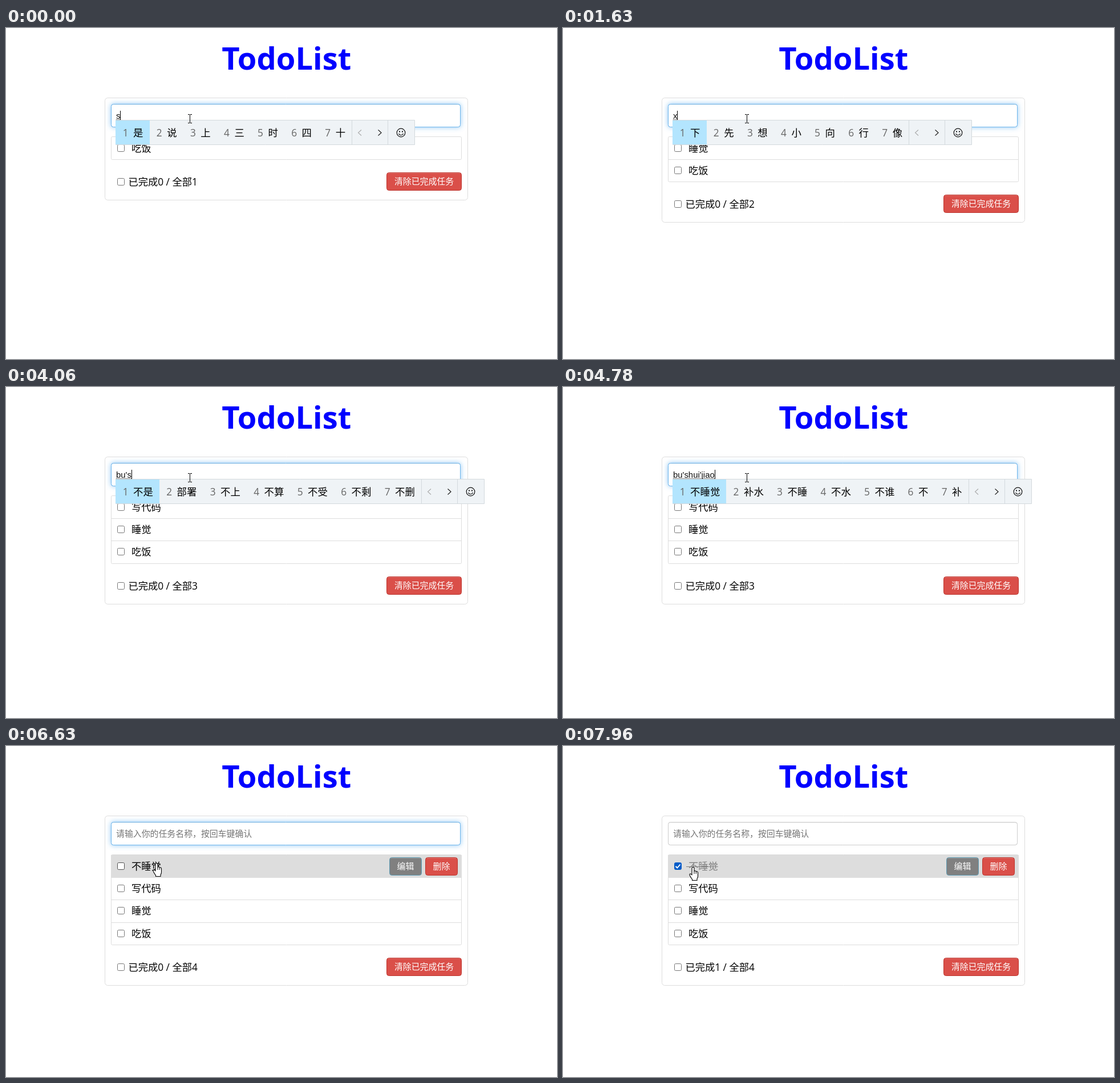
An HTML page with a canvas that plays this animation: 966x580 px, repeating every 8 s.

```html
<!DOCTYPE html>
<html lang="zh-CN">
<head>
<meta charset="utf-8">
<title>TodoList</title>
<style>
  html, body { margin: 0; width: 100%; height: 100%; overflow: hidden; background: #fff; }
  canvas { display: block; width: 966px; height: 580px; }
</style>
</head>
<body>
<canvas id="stage"></canvas>
<script>
const LOOP = 8000;
const LIST_TOP = 190.6, ROW = 39.4;
const CJK = '"Noto Sans CJK SC", "Noto Sans SC", "Noto Sans CJK", sans-serif';
const UI = '"Open Sans", ' + CJK;
const FIELD = '"Liberation Sans", ' + CJK;
const RED = ['#da4f49', '#bd362f'];
const GRAY = ['#808080', '#5f9db5'];

const canvas = document.getElementById('stage');
const ctx = canvas.getContext('2d');
const dpr = window.devicePixelRatio || 1;
canvas.width = 966 * dpr;
canvas.height = 580 * dpr;

// [time, field text, candidates]; candidates present means composing
const typing = [
  [0, "s", '是 说 上 三 时 四 十'],
  [120, "sh", '是 上 说 时 事 生 手'],
  [220, "shu", '书 数 树 属 输 熟 术'],
  [310, "shui", '水 睡 谁 税 说 帅 率'],
  [400, "shui'j", '睡觉 水晶 水饺 水机 水景 税局 税金'],
  [500, "shui'ji", '水机 水剂 水几 水迹 税基 水系 水鸡'],
  [590, "shui'jia", '水价 谁家 睡家 水加 睡佳 税价 水甲'],
  [770, "shui'jiao", '水价 谁家 睡家 水加 睡佳 税价 水甲'],
  [860, "shui'jiao", '睡觉 水饺 睡觉了 睡觉吧 睡觉去 水浇 水角'],
  [950, "睡觉"],
  [1200, ""],
  [1520, "x", ''],
  [1630, "x", '下 先 想 小 向 行 像'],
  [1730, "xi", '系 西 喜 洗 细 息 吸'],
  [1800, "xie", '系 西 喜 洗 细 息 吸'],
  [1860, "xie", '写 些 谢 鞋 斜 协 血'],
  [2030, "xie'd", '写的 写到 写得 写道 写点 写对 些的'],
  [2090, "xie'da", '写的 写到 写得 写道 写点 写对 些的'],
  [2150, "xie'da", '写大 写答 写达 鞋大 斜打 写打 谢大'],
  [2210, "xie'dai", '写大 写答 写达 鞋大 斜打 写打 谢大'],
  [2270, "xie'dai", '携带 鞋带 写代 懈怠 写带 斜带 谢戴'],
  [2430, "xie'dai'm", '写代码 携带 鞋带 写代 懈怠 写 些'],
  [2490, "xie'dai'ma", '写代码 携带 鞋带 写代 懈怠 写 些'],
  [2740, "写代码"],
  [2890, ""],
  [3690, "b", '不 吧 把 被 百 本 别'],
  [3820, "bu", '不 部 步 布 补 捕 卜'],
  [4060, "bu's", '不是 部署 不上 不算 不受 不剩 不删'],
  [4190, "bu'sh", '不是 不上 不少 不舒服 不爽 不熟 不时'],
  [4250, "bu'shu", '部署 不熟 不输 不属 不舒服 不数 补书'],
  [4430, "bu'shui", '不睡 补水 不水 不谁 布水 补税 不税'],
  [4500, "bu'shui'j", '不睡觉 补水 不睡 不水 不谁 补税 不'],
  [4570, "bu'shui'ji", '不睡觉 补水 不睡 不水 不谁 补税 不'],
  [4640, "bu'shui'jia", '不睡觉 补水 不睡 不水 不谁 补税 不'],
  [4710, "bu'shui'jiao", '不睡觉 补水 不睡 不水 不谁 补税 不'],
  [4780, "bu'shui'jiao", '不睡觉 补水 不睡 不水 不谁 不 补'],
  [4960, "不睡觉"],
  [5330, ""]
];

// [time, x, y] of the pointer hot spot
const pointer = [
  [0, 323, 158], [6330, 311, 163], [6390, 298, 170], [6450, 286, 180],
  [6510, 276, 190], [6570, 268, 200], [6630, 264, 205], [7060, 264, 212],
  [7120, 264, 219], [7180, 264, 226], [7240, 264, 231], [7360, 258, 226],
  [7420, 246, 217], [7480, 231, 208], [7540, 221, 203], [7600, 218, 201],
  [7960, 228, 212]
];

const added = [[1200, '睡觉'], [2890, '写代码'], [5330, '不睡觉']];
const caretOff = [[3260, 3690], [5510, 6010], [6510, 7060], [7510, LOOP]];
const BLUR = 7660, CHECK = 7720;

const latest = (list, t) => list.findLast(item => item[0] <= t);
const rowTop = i => Math.round(LIST_TOP + ROW * i);

function text(str, x, y, size, color, family = UI, align = 'left', weight = 400) {
  ctx.font = `${weight} ${size}px ${family}`;
  ctx.fillStyle = color;
  ctx.textAlign = align;
  ctx.fillText(str, x, y);
  return ctx.measureText(str).width;
}

function rect(x, y, w, h, fill) {
  ctx.fillStyle = fill;
  ctx.fillRect(x, y, w, h);
}

function box(x, y, w, h, r, fill, stroke) {
  ctx.beginPath();
  ctx.roundRect(x + .5, y + .5, w - 1, h - 1, r);
  ctx.fillStyle = fill;
  ctx.fill();
  ctx.strokeStyle = stroke;
  ctx.lineWidth = 1;
  ctx.stroke();
}

function line(color, width, ...pts) {
  ctx.beginPath();
  for (let i = 0; i < pts.length; i += 2) ctx.lineTo(pts[i], pts[i + 1]);
  ctx.strokeStyle = color;
  ctx.lineWidth = width;
  ctx.stroke();
}

function button(label, x, y, w, [fill, edge]) {
  box(x, y, w, 32, 4, fill, edge);
  rect(x + 3, y + 1, w - 6, 1, 'rgba(255,255,255,.2)');
  text(label, x + w / 2, y + 21.3, 14.9, '#fff', UI, 'center', 500);
}

function checkbox(y, checked, hover) {
  if (!checked) return box(195, y, 13, 13, 2, '#fff', hover ? '#4f4f4f' : '#767676');
  box(195, y, 13, 13, 2, '#005cc8', '#005cc8');
  line('#fff', 1.9, 197.5, y + 6.8, 200.3, y + 9.5, 205.5, y + 3.5);
}

function field(t, str, composing) {
  const focus = t < BLUR;
  const edge = focus ? '#6db5ec' : '#ccc';
  ctx.save();
  if (focus) {
    ctx.shadowColor = 'rgba(82,168,236,.6)';
    ctx.shadowBlur = 8 * dpr;
  }
  box(184, 133, 613, 41, 4, '#fff', edge);
  ctx.restore();
  box(184, 133, 613, 41, 4, '#fff', edge);
  rect(187, 134, 607, 1, 'rgba(0,0,0,.06)');

  let w = 0;
  if (str) w = text(str, 193, 159, 14.9, '#111', FIELD);
  else text('请输入你的任务名称，按回车键确认', 193, 159, 14.9, '#757575', FIELD);
  if (composing) {
    for (let x = 193; x < 193 + w; x += 2) rect(x, 160, 1, 1, '#222');
  }
  if (focus && !caretOff.some(([a, b]) => t >= a && t < b)) {
    rect(Math.round(193 + w), 145, 1, 16, '#000');
  }
}

function row(i, label, hover, done) {
  const y = rowTop(i), mid = y + 20;
  if (hover) rect(184, y, 615, rowTop(i + 1) - y + 1, '#ddd');
  checkbox(mid - 7, done, hover);
  const w = text(label, 220, mid + 6.3, 17.3, done ? '#808080' : '#000');
  if (done) rect(216, mid, w + 4, 1, '#808080');
  if (hover) {
    button('编辑', 672, y + 4, 57, GRAY);
    button('删除', 735, y + 4, 57, RED);
  }
}

function candidates(words) {
  const widths = words.map(w => 41.7 + 17.4 * w.length);
  const end = Math.round(192.4 + widths.reduce((a, b) => a + b));
  box(192, 161, end + 111 - 192, 44, 0, '#eff3f6', '#d3d9dd');
  rect(192, 162, Math.round(widths[0] + .5), 42, '#b3e5fe');
  let x = 192.4;
  words.forEach((word, i) => {
    text(i + 1, x + 12.3, 189.5, 17.3, '#666');
    text(word, x + 30.7, 190, 17.4, '#000');
    x += widths[i];
  });
  rect(end, 162, 1, 42, '#d3d9dd');
  rect(end + 63, 162, 1, 42, '#d3d9dd');
  line('#aaa', 1.1, end + 17, 178.5, end + 11.5, 183.5, end + 17, 188.5);
  line('#222', 1.2, end + 46.5, 178.5, end + 52, 183.5, end + 46.5, 188.5);

  const cx = end + 86.5, cy = 183.5;
  ctx.strokeStyle = '#111';
  ctx.lineWidth = 1.2;
  ctx.beginPath();
  ctx.arc(cx, cy, 7.3, 0, 7);
  ctx.stroke();
  ctx.beginPath();
  ctx.arc(cx, cy, 4.2, .35, Math.PI - .35);
  ctx.stroke();
  rect(cx - 3.5, cy - 3, 2, 2, '#111');
  rect(cx + 1.5, cy - 3, 2, 2, '#111');
}

const ARROW = new Path2D('M0 0V16.5L3.8 13L6.4 19L9 17.9L6.4 12H11.6Z');
const HAND = new Path2D('M-2 2Q-2 .5 0 .5Q2 .5 2 2V7.5Q2.6 6.4 4 6.8Q5.3 7.1 5.3 8.5' +
  'Q6.3 7.4 7.4 8Q8.5 8.5 8.5 10V16Q8.5 18.5 7 20.5V23.5H-1.5V21.5' +
  'Q-4 18.5 -5.6 15Q-6.6 12.4 -5.2 12Q-3.6 11.7 -2 14Z');

function cursor(x, y, shape) {
  if (shape === 'beam') {
    rect(x - 1, y - 6, 1, 14, '#000');
    for (const dy of [-7, 8]) {
      rect(x - 4, y + dy, 3, 1, '#000');
      rect(x, y + dy, 3, 1, '#000');
    }
    return;
  }
  ctx.save();
  ctx.translate(x, y);
  ctx.lineJoin = 'round';
  ctx.lineWidth = 1.1;
  ctx.fillStyle = '#fff';
  ctx.strokeStyle = '#000';
  const path = shape === 'hand' ? HAND : ARROW;
  ctx.fill(path);
  ctx.stroke(path);
  if (shape === 'hand') {
    line('#000', 1, 2, 7.5, 2, 12);
    line('#000', 1, 5.3, 8.5, 5.3, 12);
  }
  ctx.restore();
}

function draw(t) {
  const [, str, list] = latest(typing, t);
  const [, px, py] = latest(pointer, t);
  const items = ['吃饭'];
  for (const [at, name] of added) if (t >= at) items.unshift(name);
  const n = items.length, done = t >= CHECK;
  const bottom = rowTop(n);

  ctx.setTransform(dpr, 0, 0, dpr, 0, 0);
  rect(0, 0, 966, 580, '#fff');
  text('TodoList', 491.7, 72.5, 54.3, '#00f', UI, 'center', 700);

  box(173, 122, 637, bottom - 50, 5, '#fff', '#ddd');
  field(t, str, list !== undefined);

  box(184, 190, 615, bottom - 189, 2, '#fff', '#ddd');
  for (let i = 1; i < n; i++) rect(184, rowTop(i), 615, 1, '#ddd');
  const over = py < 190 ? -1 : Math.floor((py - LIST_TOP) / ROW);
  items.forEach((label, i) => row(i, label, i === over, done && i === 0));

  checkbox(bottom + 33, false, false);
  text(`已完成${done ? 1 : 0} / 全部${n}`, 214.4, bottom + 46, 17.3, '#000');
  button('清除已完成任务', 667, bottom + 23, 132, RED);

  if (list) candidates(list.split(' '));
  cursor(px, py, py < 174 ? 'beam' : over >= 0 && px < 272 ? 'hand' : 'arrow');
}

const start = performance.now();
function tick() {
  draw((performance.now() - start) % LOOP);
  requestAnimationFrame(tick);
}
tick();
</script>
</body>
</html>
```
